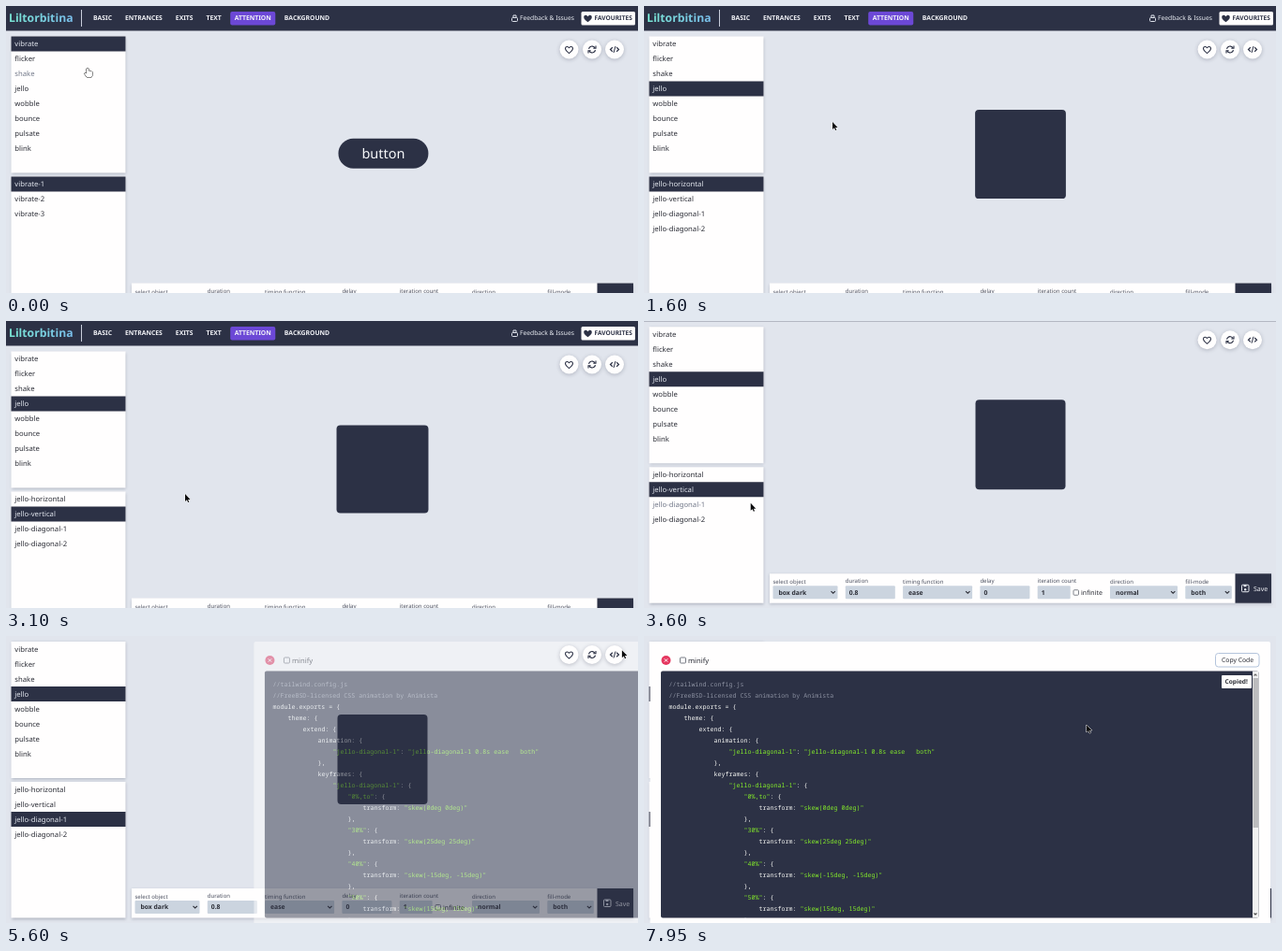
An HTML page with a canvas that plays this animation: 674 by 307 pixels, repeating every 8000 ms.

```html
<!DOCTYPE html>
<html lang="en">
<head>
<meta charset="utf-8">
<title>CSS animation picker</title>
<style>
html, body { margin: 0; width: 100%; height: 100%; overflow: hidden; background: #e1e5ed; }
canvas { display: block; width: 674px; height: 307px; }
</style>
</head>
<body>
<canvas id="stage"></canvas>
<script>
const W = 674, H = 307, LOOP = 8000;
const DARK = '#2c3145', BG = '#e1e5ed', WHITE = '#fffefe', FIELD = '#cbd4df', INK = '#2b2d36';
const SANS = '"Noto Sans", "Open Sans", sans-serif';
const MONO = '"Noto Sans Mono", "DejaVu Sans Mono", monospace';
const dpr = window.devicePixelRatio || 1;

const setup = cv => {
  cv.width = W * dpr;
  cv.height = H * dpr;
  const c = cv.getContext('2d');
  c.scale(dpr, dpr);
  c.textRendering = 'geometricPrecision';
  return c;
};
const screen = setup(document.getElementById('stage'));
const sheet = document.createElement('canvas');
const sheetCtx = setup(sheet);
let g = screen;

// ---------- timing ----------
const PICK_JELLO = 1054, PICK_VERTICAL = 2565, PICK_DIAGONAL = 4100;
const SCROLL_AT = 3250, OPEN_AT = 5502, COPIED_AT = 7550;

const clamp = (v, lo = 0, hi = 1) => Math.max(lo, Math.min(hi, v));

// CSS "ease": cubic-bezier(.25, .1, .25, 1)
function ease(x) {
  const bez = (a, b, s) => 3 * a * s * (1 - s) ** 2 + 3 * b * s * s * (1 - s) + s ** 3;
  let lo = 0, hi = 1;
  for (let i = 0; i < 24; i++) {
    const mid = (lo + hi) / 2;
    if (bez(.25, .25, mid) < x) lo = mid; else hi = mid;
  }
  return bez(.1, 1, lo);
}

// Jello amount by progress, eased between key points
const JELLO = [[0, 0], [.3, .25], [.4, -.25], [.5, .15], [.65, -.05], [.75, .05], [1, 0]];
function jello(p) {
  const i = JELLO.findIndex(k => k[0] > p);
  if (i < 1) return 0;
  const [p0, v0] = JELLO[i - 1], [p1, v1] = JELLO[i];
  return v0 + (v1 - v0) * ease((p - p0) / (p1 - p0));
}

// Pointer stops: arrival time, x, y. It rests between short moves.
const STOPS = [
  [100, 87, 66], [700, 85, 83], [1600, 201, 124], [2350, 95, 203], [3100, 191, 185],
  [3650, 97, 197], [4500, 260, 291], [4750, 291, 277], [4900, 507, 159], [5100, 631, 37],
  [5250, 657, 15], [5900, 626, 78], [6050, 598, 77], [6350, 609, 51], [6550, 618, 28],
  [7800, 575, 76], [7950, 472, 95]
];
function pointerAt(t) {
  const i = STOPS.findIndex(s => s[0] > t);
  if (i === 0) return STOPS[0].slice(1);
  if (i < 0) return STOPS[STOPS.length - 1].slice(1);
  const [t0, x0, y0] = STOPS[i - 1], [t1, x1, y1] = STOPS[i];
  const travel = Math.min(300, (t1 - t0) / 2);
  const k = clamp(1 - (t1 - t) / travel);
  return [x0 + (x1 - x0) * k, y0 + (y1 - y0) * k];
}

// ---------- drawing helpers ----------
function text(s, x, cy, size, color = INK, weight = 400, font = SANS) {
  g.font = `${weight} ${size}px ${font}`;
  g.fillStyle = color;
  g.fillText(s, x, cy + size * .36);
}
function rect(x, y, w, h, color, r = 0, stroke) {
  g.beginPath();
  g.roundRect(x, y, w, h, r);
  if (color) { g.fillStyle = color; g.fill(); }
  if (stroke) { g.strokeStyle = stroke; g.stroke(); }
}
function disc(x, y, r, color) {
  g.beginPath();
  g.arc(x, y, r, 0, Math.PI * 2);
  g.fillStyle = color;
  g.fill();
}
function line(color, width, ...pts) {
  g.beginPath();
  for (let i = 0; i < pts.length; i += 2) g.lineTo(pts[i], pts[i + 1]);
  g.strokeStyle = color;
  g.lineWidth = width;
  g.stroke();
  g.lineWidth = 1;
}
function chevron(color, x, y, w, h) {
  line(color, 1.1, x - w, y - h, x, y, x + w, y - h);
}
function shadowed(blur, alpha, draw) {
  g.save();
  g.shadowColor = `rgba(30,35,60,${alpha})`;
  g.shadowBlur = blur * dpr;
  g.shadowOffsetY = dpr;
  draw();
  g.restore();
}
function at(x, y, draw, scale = 1, turn = 0) {
  g.save();
  g.translate(x, y);
  g.rotate(turn);
  g.scale(scale, scale);
  draw();
  g.restore();
}
function heart(x, y, size, fill) {
  at(x, y, () => {
    g.beginPath();
    for (const s of [-1, 1]) {
      g.moveTo(0, .9);
      g.bezierCurveTo(s * .5, .5, s, .1, s, -.35);
      g.bezierCurveTo(s, -1, s * .25, -1.05, 0, -.5);
    }
    g.fillStyle = g.strokeStyle = DARK;
    g.lineWidth = 1.1 / size;
    if (fill) g.fill(); else g.stroke();
  }, size);
}

// ---------- page ----------
function header(t) {
  rect(0, 0, W, 26.5, DARK);
  const tint = g.createLinearGradient(3, 0, 72, 0);
  tint.addColorStop(0, '#78e3d2');
  tint.addColorStop(1, '#79bdea');
  text('Liltorbitina', 3, 13, 12.2, tint, 700);
  line('#c9cedb', 1, 80.5, 4, 80.5, 22);
  let x = 93;
  for (const name of ['BASIC', 'ENTRANCES', 'EXITS', 'TEXT', 'ATTENTION', 'BACKGROUND']) {
    g.font = `600 6.8px ${SANS}`;
    const w = g.measureText(name).width;
    if (name === 'ATTENTION') rect(x - 4.5, 6, w + 9, 14.5, '#6c48d6', 2);
    text(name, x, 13, 6.8, '#f4f5f9', 600);
    x += w + 14;
  }
  rect(539.5, 12.5, 6, 4, null, 1, '#dfe3ec');
  line('#dfe3ec', 1, 541, 12.5, 541, 10, 544, 10, 544, 12.5);
  text('Feedback & Issues', 548, 13, 6.7, '#eceff5', 500);
  rect(613.5, 6, 57.5, 14.5, WHITE, 1.5);
  const beat = clamp((t + 1400) % 1500 / 675);
  heart(620.5, 13.5, 4.3 * (1 - .12 * Math.sin(2 * Math.PI * beat) ** 2), true);
  text('FAVOURITES', 627.5, 13, 6.6, DARK, 700);
}

function list(items, top, height, picked, px, py) {
  shadowed(3, .28, () => rect(5.5, top, 122, height, WHITE));
  items.forEach((name, i) => {
    const y = top + i * 16, on = name === picked;
    const hover = px > 5 && px < 128 && py >= y && py < y + 16;
    if (on) rect(5.5, y, 122, 16, DARK);
    text(name, 9.3, y + 8, 7.7, on ? '#e3e7ef' : hover ? '#73798a' : INK);
  });
}

function roundButtons() {
  for (const x of [600.5, 625, 649]) shadowed(4, .25, () => disc(x, 46.5, 10, WHITE));
  heart(600.5, 47, 4);
  for (const turn of [0, Math.PI]) {
    at(625, 46.5, () => {
      g.beginPath();
      g.arc(0, 0, 3.5, Math.PI * 1.05, Math.PI * 1.85);
      g.strokeStyle = DARK;
      g.lineWidth = 1.2;
      g.stroke();
      line(DARK, 1.1, 4, -4, 4, -1.2, 1.3, -1.2);
    }, 1, turn);
    at(649, 46.5, () => line(DARK, 1.2, 2.2, -2.2, 4.5, 0, 2.2, 2.2), 1, turn);
  }
  line(DARK, 1, 650, 43, 648, 50);
}

function toolbar() {
  const top = 296.5;
  let x = 137.5;
  shadowed(3, .2, () => rect(134, top, 535, 31.5, WHITE));
  const field = (label, w, value, select) => {
    text(label, x, top + (select ? 9 : 8), 6, '#4a4f5f');
    rect(x, top + 13, w, 14, FIELD, 1);
    text(value, x + (select ? 6 : 4), top + 20, 6.8, INK, 600);
    if (select) chevron(INK, x + w - 4.8, top + 21, 2.2, 2.2);
    x += w + 8.3;
  };
  field('select object', 69, 'box dark', true);
  field('duration', 53, '0.8');
  field('timing function', 74, 'ease', true);
  field('delay', 53, '0');
  field('iteration count', 35, '1');
  rect(458, top + 17.5, 5.5, 5.5, WHITE, 1, '#80848c');
  text('infinite', 466, top + 20, 7);
  x = 497;
  field('direction', 72, 'normal', true);
  field('fill-mode', 49.5, 'both', true);
  rect(630.5, top, 38.5, 31.5, DARK);
  rect(637.5, top + 12, 7.5, 7.5, null, 1, '#e6e9f0');
  rect(639.5, top + 12, 3, 2, '#e6e9f0');
  disc(641.2, top + 17, 1.2, '#e6e9f0');
  text('Save', 650, top + 16, 7, '#f1f3f7', 500);
}

function preview(t) {
  g.save();
  g.translate(401.5, 158.5);
  if (t < PICK_JELLO) {
    const a = 2 * Math.PI * (.8 + Math.max(0, t - 60) / 300);
    g.translate(-Math.sin(a), 1.2 * Math.sin(2 * a));
    rect(-48, -16, 96, 32, DARK, 16);
    g.textAlign = 'center';
    text('button', 0, -.3, 14.5, '#f8f9fb');
  } else {
    const begun = t >= PICK_DIAGONAL ? PICK_DIAGONAL : t >= PICK_VERTICAL ? PICK_VERTICAL : PICK_JELLO;
    const k = jello((t - begun) / 800);
    if (begun === PICK_DIAGONAL) {
      const skew = Math.tan(clamp(k, -.15, .15) * 100 * Math.PI / 180);
      g.transform(1, skew, skew, 1, 0, 0);
    } else {
      const s = begun === PICK_VERTICAL ? -k : k;
      g.scale(1 + s, 1 - s);
    }
    rect(-48, -48, 96, 96, DARK, 4);
  }
  g.restore();
}

const KINDS = ['vibrate', 'flicker', 'shake', 'jello', 'wobble', 'bounce', 'pulsate', 'blink'];
const VIBRATES = ['vibrate-1', 'vibrate-2', 'vibrate-3'];
const JELLOS = ['jello-horizontal', 'jello-vertical', 'jello-diagonal-1', 'jello-diagonal-2'];

function page(t, px, py) {
  const isJello = t >= PICK_JELLO;
  const picked = JELLOS[t >= PICK_DIAGONAL ? 2 : t >= PICK_VERTICAL ? 1 : 0];
  header(t);
  list(KINDS, 32.5, 146, isJello ? 'jello' : 'vibrate', px, py);
  list(isJello ? JELLOS : VIBRATES, 182.5, 145.5, isJello ? picked : 'vibrate-1', px, py);
  preview(t);
  toolbar();
}

// ---------- code panel ----------
const step = (when, value) => [[20, `"${when}": {`], [24, `transform: "skew(${value})"`], [20, '},']];
const CODE = [
  [0, '//tailwind.config.js'],
  [0, '//FreeBSD-licensed CSS animation by Animista'],
  [0, 'module.exports = {'],
  [4, 'theme: {'],
  [8, 'extend: {'],
  [12, 'animation: {'],
  [16, '"jello-diagonal-1": "jello-diagonal-1 0.8s ease   both"'],
  [12, '},'],
  [12, 'keyframes: {'],
  [16, '"jello-diagonal-1": {'],
  ...step('0%,to', '0deg 0deg'),
  ...step('30%', '25deg 25deg'),
  ...step('40%', '-15deg, -15deg'),
  ...step('50%', '15deg, 15deg')
];

function code() {
  g.save();
  g.beginPath();
  g.rect(18, 37.5, 631, 264);
  g.clip();
  CODE.forEach(([indent, src], row) => {
    let x = 26.5 + indent * 4;
    const y = 51.3 + row * 12;
    if (src.startsWith('//')) return text(src, x, y, 6.667, '#8b90a0', 400, MONO);
    for (const part of src.split(/("[^"]*")/)) {
      text(part, x, y, 6.667, part[0] === '"' ? '#84ec2a' : '#f6f7f4', 500, MONO);
      x += part.length * 4;
    }
  });
  g.restore();
}

function panel(t, px, py) {
  rect(6.5, 6, 661.5, 320, WHITE, 2);
  disc(23.5, 26, 5, '#e5375f');
  for (const s of [-1.7, 1.7]) line('#fff', 1, 23.5 - s, 24.3, 23.5 + s, 27.7);
  rect(38.5, 23, 6, 6, WHITE, 1, '#777b84');
  text('minify', 47, 26, 7.6);
  const hover = px > 610 && px < 656 && py > 18 && py < 33;
  rect(609.5, 18.5, 46.5, 14.5, WHITE, 3, t > 6750 ? '#b4c4dc' : '#d3d9e2');
  text('Copy Code', 616, 25.8, 6.8, hover ? '#7a8090' : INK);
  rect(18, 37.5, 637.5, 264, DARK, 2);
  code();
  rect(649, 37.5, 6.5, 264, '#f1f1f1');
  rect(649.5, 45, 5.5, 160, '#bcbcbe');
  chevron('#666', 652, 41, 1.5, -1.5);
  chevron('#444', 652, 298, 1.5, 1.5);
  if (t >= COPIED_AT) {
    rect(616, 42, 32, 14, WHITE, 1);
    text('Copied!', 619.5, 49, 6.6, INK, 600);
  }
}

function flyIn(t, rest, px, py) {
  g = sheetCtx;
  g.clearRect(0, 0, W, H);
  at(500 * rest, 0, () => panel(t, px, py));
  g = screen;
  g.globalAlpha = 1 - rest;
  g.drawImage(sheet, 0, 0, W, H);
  g.globalAlpha = 1;
}

// ---------- pointer ----------
const ARROW = new Path2D('M0 0V8L1.9 6.3L3.1 9L4.3 8.5L3.1 5.9H5.6Z');
const HAND = new Path2D('M-1 .8Q0-.4 1 .8V3.6Q2 3 2.7 3.9Q3.6 3.4 4.2 4.3Q5.4 4 5.4 5.3V7.4L4.3 10H-.9L-3.3 6.6Q-3.4 5.2-2 5.6L-1 6.5Z');

function pointer(t, x, y) {
  const overList = x < 128 && (t < 3500 || t >= 3800);
  const overCopy = t > 6400 && x > 610 && y < 33;
  const hand = overList || overCopy;
  at(x, y, () => {
    const shape = hand ? HAND : ARROW;
    g.lineJoin = 'round';
    g.strokeStyle = hand ? '#111' : '#fff';
    g.stroke(shape);
    g.fillStyle = hand ? '#fff' : '#0c0c0e';
    g.fill(shape);
  });
}

const start = performance.now();
function frame() {
  const t = (performance.now() - start) % LOOP;
  const [x, y] = pointerAt(t);
  const scroll = 26.5 * ease(clamp((t - SCROLL_AT) / 400));
  const rest = (1 - clamp((t - OPEN_AT) / 500)) ** 3;
  rect(0, 0, W, H, BG);
  at(0, -scroll, () => page(t, x, y + scroll));
  if (rest < 1) flyIn(t, rest, x, y);
  // the round buttons stay above the panel until it has nearly landed
  g.globalAlpha = clamp(rest * 2);
  if (rest > 0) at(0, -scroll, roundButtons);
  g.globalAlpha = 1;
  pointer(t, x, y);
  requestAnimationFrame(frame);
}
frame();
</script>
</body>
</html>
```
